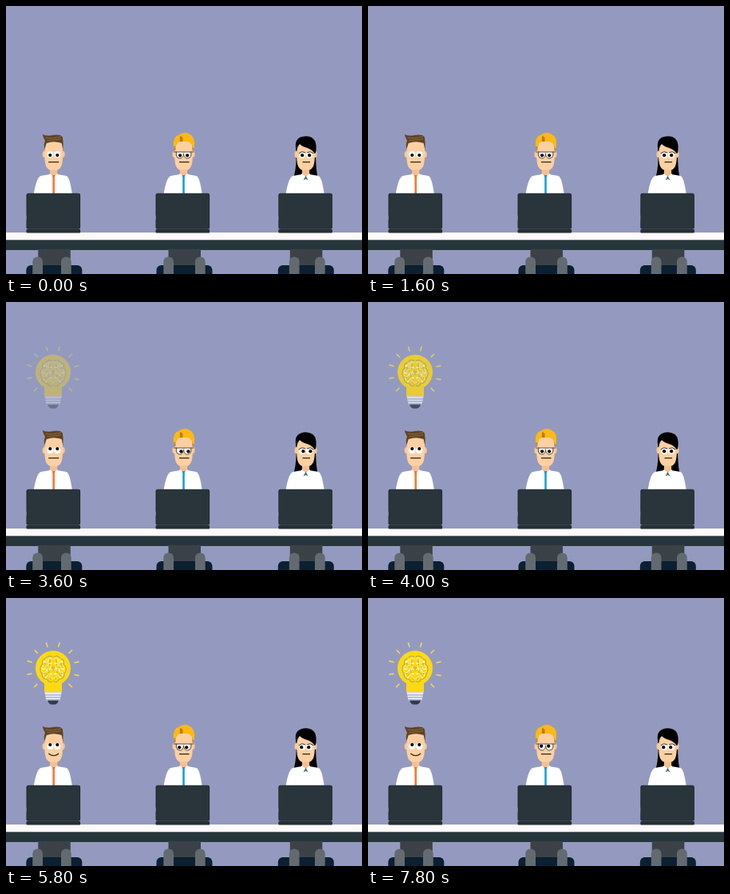
Write an HTML page that moves like this. It is 446 by 336 pixels and loops after 8 s.

```html
<!DOCTYPE html>
<html lang="en">
<head>
<meta charset="utf-8">
<title>Three at a desk</title>
<style>
  html, body { margin: 0; width: 100%; height: 100%; overflow: hidden; background: #949abf; }
  svg { display: block; width: 100vw; height: 100vh; }
  .line { fill: none; stroke-linecap: round; stroke-linejoin: round; }
</style>
</head>
<body>
<svg viewBox="0 0 446 336">
  <defs>
    <g id="head">
      <rect x="-4.6" y="198" width="9.2" height="15" fill="#f5c08f"/>
      <ellipse cx="-11.8" cy="186" rx="2.2" ry="4" fill="#f9c795"/>
      <ellipse cx="11.8" cy="186" rx="2.2" ry="4" fill="#f9c795"/>
      <path fill="#fdd0a2" d="M-11.3 168H11.3V190Q10.8 205 4 205.5H-4Q-10.8 205 -11.3 190Z"/>
    </g>
    <g id="shirt">
      <path fill="#fff" d="M-25 236C-23 225 -21 215 -16 213L-4.5 211Q0 214 4.5 211L16 213C20 215 21.5 225 23.3 236Z"/>
    </g>
    <g id="tie">
      <path d="M-2 212H2L1.3 215V236H-1.3V215Z"/>
    </g>
    <g id="eyes" fill="#fff">
      <circle cx="-4.4" cy="186" r="4.1"/><circle cx="4.6" cy="186" r="4.1"/>
    </g>
    <g id="pupils">
      <circle cx="-4.4" cy="187" r="2.1"/><circle cx="4.6" cy="187" r="2.1"/>
    </g>
    <g id="laptop">
      <path fill="#e9ebf1" d="M-33.5 262Q-35.5 265 -33.5 269Z"/>
      <rect x="-34" y="234.7" width="67.6" height="45" rx="2.5" fill="#202b30"/>
      <rect x="-33" y="235.6" width="65.6" height="43.6" rx="2" fill="#29353b"/>
      <rect x="-34" y="280" width="67.6" height="4.4" rx="1" fill="#242f34"/>
    </g>
    <g id="seat">
      <rect x="-20" y="305" width="40.5" height="22" fill="#3b4247"/>
      <rect x="-35" y="325" width="70" height="16" rx="6" fill="#0b2031"/>
    </g>
    <rect id="armrest" y="314.5" width="12.7" height="30" rx="6" fill="#636b71"/>
    <g id="halfBrain" class="line">
      <path stroke="#b9ab4a" stroke-width="1.1" d="M-1 74C-6 71 -9 75 -9 76C-14 76 -14 81 -13 83C-18 87 -16 93 -14 95C-14 101 -9 102 -7 102C-6 106 -2 106 -1 104M-4 78V83L-8 86M-10 81V87M-5 88V94L-9 97M-13 93L-10 95M-1 86V91M-3 99V102"/>
      <path stroke="#fff8c4" stroke-width=".9" d="M-1 76Q-6 73 -6 78T-11 80M-2 82H-6V85H-10V89H-14M-1 90Q-6 86 -8 91T-14 92M-2 95H-6L-9 100M-1 101L-5 98M-12 84L-14 87M-12 95V98M-8 76L-9 79M-3 86L-5 91"/>
      <g fill="#fffbe0">
        <circle cx="-11" cy="80" r="1.2"/><circle cx="-13" cy="89" r="1.1"/><circle cx="-2.5" cy="82" r="1.1"/>
        <circle cx="-9" cy="100" r="1.1"/><circle cx="-2.5" cy="95" r="1.1"/><circle cx="-8" cy="91" r="1.1"/>
      </g>
    </g>
  </defs>

  <rect width="446" height="336" fill="#949abf"/>

  <g id="bulb" transform="translate(59)">
    <path class="line" stroke="#f9d84c" stroke-width="1.5" d="M-32 95.8L-27 95M-32 79L-27 80.5M-23 65.5L-19.5 69M-8.5 56.5L-7 61M8 56.5L6.7 61M23.5 65.5L20 69M32 80L27 81M32 97.2L27 96.2M-23.5 111.5L-20 108M23.5 111.5L20 108"/>
    <circle cy="88" r="22" fill="#fcd913"/>
    <rect x="-11" y="104" width="22" height="14.3" fill="#fcd913"/>
    <use href="#halfBrain"/>
    <use href="#halfBrain" transform="scale(-1 1)"/>
    <path fill="#e8eaf0" d="M-10.5 118.3H10.5L8.5 128.5H-8.5Z"/>
    <path class="line" stroke="#949abf" stroke-width=".9" d="M-10 121.7H10M-9.5 124.7H9.5M-8.5 127.7H8.5"/>
    <path fill="#303b50" d="M-7 128.5H7Q5 133.5 2 133.5H-2Q-5 133.5 -7 128.5Z"/>
  </g>

  <g transform="translate(59.7)">
    <use href="#shirt"/><use href="#head"/>
    <path fill="#fff" d="M-5 210L0 214L5 210L6 216L0 214L-6 216Z"/>
    <use href="#tie" fill="#ef7b2e"/>
    <path fill="#5d4324" d="M-14 161Q-8 163.5 -2 162Q8 160.5 11 164Q12.5 170 11.5 180L10 172Q0 168.5 -9 172L-11.5 180Q-12.5 173 -11 168Q-13 165 -14 161Z"/>
    <path class="line" stroke="#8d6b40" d="M-10 165Q-2 167 9 163.5M-8 168.5Q2 168 9 166.5"/>
    <use href="#eyes"/>
    <use class="pupils" href="#pupils"/>
    <path class="line" id="mouth" stroke="#352219" stroke-width="1.3"/>
  </g>

  <g transform="translate(222.5)">
    <use href="#shirt"/><use href="#head"/>
    <path fill="#fff" d="M-5 210L0 214L5 210L6 216L0 214L-6 216Z"/>
    <use href="#tie" fill="#1b9ed8"/>
    <path fill="#c08a2e" d="M-12 172H-10V181H-12ZM10.5 170H12.5V181H11Z"/>
    <path fill="#fdb913" d="M-12.5 176Q-14 164 -6 161.5Q1 156.5 8 161Q15 164 13.3 178H11.3Q10.5 171 5 170H-3Q-8 170 -9.5 176Z"/>
    <path fill="#b87f1c" d="M-4 162.5L-1 165V170H-4.5Q-5.5 166 -4 162.5Z"/>
    <use href="#eyes" y=".8"/>
    <use class="pupils" href="#pupils" y=".3"/>
    <path class="line" stroke="#4a4036" stroke-width=".9" d="M-12 183H12M-9.2 183V187Q-8.5 191 -4.5 191Q-.5 191 0 185Q.5 191 4.7 191Q8.7 191 9.4 187V183"/>
    <path class="line" stroke="#352219" stroke-width="1.3" d="M-5 195.7H6.5"/>
  </g>

  <g transform="translate(375.5)">
    <path d="M-12 175H12.5Q12 198 14.5 213H-14.5Q-11 199 -12 175Z"/>
    <use href="#shirt"/><use href="#head"/>
    <path fill="#fff" d="M-5 210L0 214L5 210L7 215L0 214L-7 215Z"/>
    <path fill="#587566" d="M0 212.5L3 218.5L0 217L-3 218.5Z"/>
    <path d="M-12 181Q-16 164 0 163.3Q16 163.5 12.5 184L11.3 185Q8 180 2 178Q-5 176 -7.5 173Q-10.5 176 -11.3 182Z"/>
    <use href="#eyes" y=".8"/>
    <path class="line" stroke="#241a18" stroke-width=".9" d="M-8.5 184.5Q-5 181.5 -1 183.5M2 183.5Q6 181.5 9.5 184.5"/>
    <use class="pupils" href="#pupils" y=".2"/>
    <path class="line" stroke="#352219" stroke-width="1.2" d="M-3.5 195.7H5"/>
  </g>

  <rect y="284" width="446" height="10" fill="#fff9fa"/>
  <rect y="293.3" width="446" height="12.7" fill="#27363c"/>
  <use href="#laptop" x="59.5"/><use href="#laptop" x="221.5"/><use href="#laptop" x="375.3"/>
  <use href="#seat" x="60.3"/><use href="#seat" x="223.5"/><use href="#seat" x="375.8"/>
  <use href="#armrest" x="33.3"/><use href="#armrest" x="69"/>
  <use href="#armrest" x="197.3"/><use href="#armrest" x="237"/>
  <use href="#armrest" x="354.8"/><use href="#armrest" x="387"/>
</svg>
<script>
  const LOOP = 8000, SWEEP = 1600;
  const bulb = document.getElementById('bulb');
  const mouth = document.getElementById('mouth');
  const [left, middle, right] = document.querySelectorAll('.pupils');
  const ramp = (t, from, to) => Math.min(1, Math.max(0, (t - from) / (to - from)));
  const look = (eyes, x, y) => eyes.setAttribute('transform', `translate(${x} ${y})`);

  function draw(now) {
    const t = now % LOOP;
    const sweep = 1.3 * Math.sin(t / SWEEP * 2 * Math.PI);
    const glance = ramp(t, 2800, 3600);
    look(left, sweep * (1 - glance), -3 * glance);
    look(middle, sweep, -1.6 * ramp(t, 6100, 6700));
    look(right, sweep, 0);
    bulb.setAttribute('opacity', ramp(t, 3200, 4200));
    mouth.setAttribute('d', t < 4800 ? 'M-6 195.7H6' : 'M-6 195.3Q0 200 6 195.3');
  }

  const start = performance.now();
  function tick() {
    draw(performance.now() - start);
    requestAnimationFrame(tick);
  }
  tick();
</script>
</body>
</html>
```
